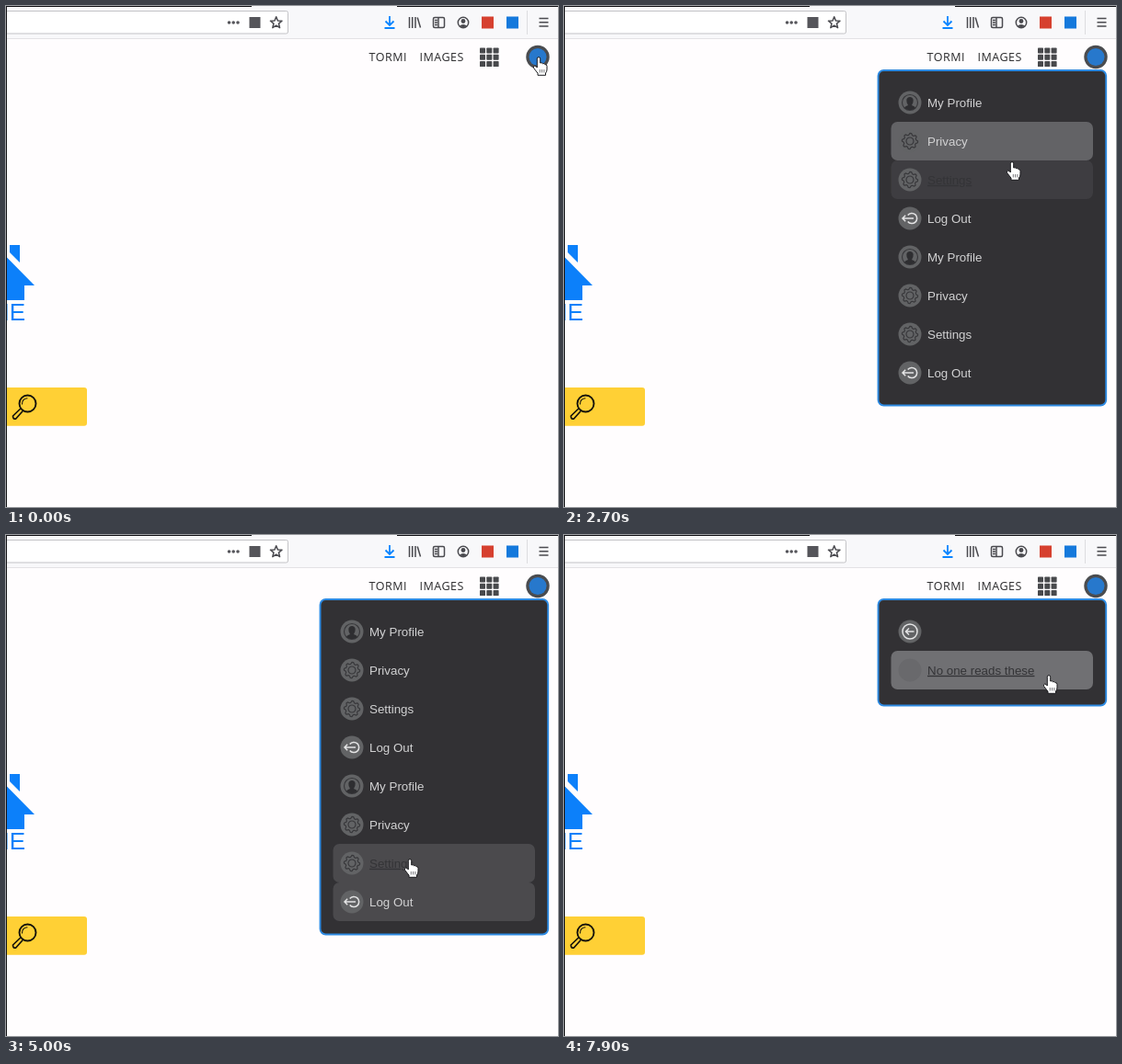
Recreate the animation shown at these times as an HTML page. Size 600 px wide and 545 px high, loop 8 s.

```html
<!DOCTYPE html>
<html lang="en">
<head>
<meta charset="utf-8">
<title>Dropdown menu</title>
<style>
html, body { margin: 0; width: 100%; height: 100%; overflow: hidden; background: #fffdfe; }
svg { display: block; width: 600px; height: 545px; }
.nav { font: 12.5px "Open Sans", "Noto Sans", sans-serif; letter-spacing: .5px; fill: #2a2a2c; }
.home { font: 26px "Liberation Sans", Arial, sans-serif; fill: #0c80fa; }
.row text { font: 13.35px "Liberation Sans", Arial, sans-serif; fill: #d2d2d3; }
.row.on text { fill: #343437; text-decoration: underline; }
.line { fill: none; stroke: #4a4a4f; stroke-width: 1.5; }
</style>
</head>
<body>
<svg viewBox="0 0 600 545">
  <defs><clipPath id="clip"><rect id="hole" x="342" y="70" width="247" height="364" rx="6"/></clipPath></defs>
  <rect width="600" height="545" fill="#fffdfe"/>

  <!-- browser toolbar -->
  <rect width="600" height="35" fill="#f8f8fa"/>
  <path d="M0 35.5H600" stroke="#e3e2e5"/>
  <path d="M0 .5H267M425 .5H600" stroke="#101014"/>
  <rect x="-10" y="5.5" width="316.5" height="24.500" rx="2" fill="#fff" stroke="#c3c3c6"/>
  <g fill="#55555a">
    <circle cx="242.500" cy="18" r="1.800"/><circle cx="247.200" cy="18" r="1.800"/><circle cx="252" cy="18" r="1.800"/>
    <rect x="264.500" y="12" width="12" height="12"/>
  </g>
  <path id="star" class="line" stroke-linejoin="round"/>
  <path d="M417 11V20M412.500 16.500L417 21L421.500 16.500M411.500 24H422.500" fill="none" stroke="#0a84ff" stroke-width="1.800"/>
  <path class="line" d="M438.500 12V24M441.700 12V24M445 12V24M447.200 12.500L450.500 23.500"/>
  <rect class="line" x="464.500" y="12.500" width="12" height="11" rx="1.500"/>
  <path class="line" d="M470 13V23M466 15.500H469M466 18H469M466 20.500H469" stroke-width="1.200"/>
  <circle class="line" cx="497" cy="18" r="5.700"/>
  <path d="M493 21.500Q497 18.500 501 21.500Q497 25 493 21.500" fill="#4a4a4f"/>
  <circle cx="497" cy="16.500" r="2.400" fill="#4a4a4f"/>
  <rect x="517" y="11.500" width="13" height="13" fill="#d6402f"/>
  <rect x="544" y="11.500" width="13" height="13" fill="#1479dc"/>
  <path d="M566.500 5V31" stroke="#dcdcdf"/>
  <path class="line" d="M579.500 13.500H589.500M579.500 17.800H589.500M579.500 22H589.500"/>

  <!-- page -->
  <text class="nav" x="394.500" y="60">TORMI</text>
  <text class="nav" x="449.500" y="60">IMAGES</text>
  <g id="grid" fill="#48494c"></g>
  <circle cx="578" cy="55.500" r="12.700" fill="#4b4c4f"/>
  <circle cx="578" cy="55.500" r="9.500" fill="#2778cc"/>
  <path d="M4 260H15V279L4 268ZM0 272.500L31 304H20V320H0Z" fill="#0c80fa"/>
  <text class="home" x="21" y="342" text-anchor="end">HOME</text>
  <rect x="-5" y="415" width="93" height="41.700" rx="3" fill="#ffd035"/>
  <g fill="none" stroke="#15130c" stroke-linecap="round">
    <circle cx="23.500" cy="432.500" r="9" stroke-width="1.900"/>
    <path d="M17.500 433Q17.500 427.500 23 426.800" stroke-width="1.100"/>
    <path d="M15.800 438L7.500 446Q7.500 449.500 10.500 449.200L18.300 440.500" stroke-width="1.700"/>
  </g>
  <path d="M.5 0V545" stroke="#151518"/>

  <!-- dropdown -->
  <g id="menu">
    <rect id="panel" x="341.500" y="70" width="247.700" height="365" rx="6" fill="#323134" stroke="#2d8ae2" stroke-width="1.900"/>
    <g clip-path="url(#clip)"><g id="main"></g><g id="sub"></g></g>
  </g>

  <g id="cursor">
    <path d="M-1.700 9V1.200Q-1.700 -.3 0 -.3Q1.700 -.3 1.700 1.200V6Q3.600 5.200 4.300 6.700Q6.200 6 6.800 7.600Q9 7.300 9 9.500V13Q9 15.500 7.500 17V19.300H-1V17.200L-5.400 11.500Q-6 9.500 -4.300 9Q-3 9 -1.700 11Z"
      fill="#fff" stroke="#1b1b1e" stroke-width="1" stroke-linejoin="round"/>
    <path d="M1.300 13V16.500M3.600 13V16.500M5.900 13V16.500" stroke="#55555a" stroke-width=".8"/>
  </g>
</svg>
<script>
const LOOP = 8000, STEP = 100;
const OPEN = 400, SWAP = 6400, SLIDE = 245, FADE = .2;
const $ = id => document.getElementById(id);

const ring = (n, radius, cx = 0, cy = 0) => 'M' + Array.from({ length: n }, (_, i) => {
  const a = i / n * 2 * Math.PI - Math.PI / 2, r = radius(i);
  return (cx + r * Math.cos(a)).toFixed(2) + ' ' + (cy + r * Math.sin(a)).toFixed(2);
}).join('L') + 'Z';

$('star').setAttribute('d', ring(10, i => i % 2 ? 2.9 : 6.6, 293.7, 18.3));
for (let i = 0; i < 9; i++)
  $('grid').innerHTML += `<rect x="${515 + i % 3 * 7.3}" y="${45.5 + (i / 3 | 0) * 7.3}" width="6" height="6" rx=".7"/>`;

const dark = 'fill="none" stroke="#38383b" stroke-width="1.2"';
const light = 'fill="none" stroke="#e4e4e5" stroke-width="1.5"';
const icons = {
  user: `<circle r="8.500" ${dark}/><path d="M-6 6Q-5.500 3.800 -2 3Q-4 0 -3.700 -3Q-3 -6 0 -6Q3 -6 3.700 -3Q4 0 2 3Q5.500 3.800 6 6Q0 10.500 -6 6Z" fill="#2e2e31"/>`,
  gear: `<path d="${ring(32, i => i % 4 < 2 ? 8.600 : 6.800)}" ${dark} stroke-linejoin="round"/><circle r="4" ${dark}/>`,
  exit: `<path d="M-2.300 -3.500A5.600 5.600 0 1 1 -2.300 3.500M4 0H-8M-4.800 -3.200L-8 0L-4.800 3.200" ${light}/>`,
  back: `<circle r="8" ${light} stroke-width="1.200"/><path d="M4.500 0H-4.500M-1 -3.500L-4.500 0L-1 3.500" ${light}/>`,
  none: ''
};

function addRows(id, items) {
  $(id).innerHTML = items.map(([icon, label], i) =>
    `<g class="row" transform="translate(376 ${105 + 42 * i})">
      <rect x="-20.500" y="-21" width="219.500" height="42" rx="7" fill="#707073" opacity="0"/>
      <circle r="12.500" fill="${icon === 'none' ? '#69696c' : '#626365'}"/>${icons[icon]}
      <text x="19" y="4.800">${label}</text></g>`).join('');
  return [...$(id).children];
}

const half = [['user', 'My Profile'], ['gear', 'Privacy'], ['gear', 'Settings'], ['exit', 'Log Out']];
const mainRows = addRows('main', [...half, ...half]);
const subRows = addRows('sub', [['back', ''], ['none', 'No one reads these']]);

// [time, x, y] of the fingertip
const path = [
  [0, 579, 56], [900, 579, 56], [1100, 572, 64], [1400, 530, 92], [1600, 510, 101],
  [1900, 504, 109], [2200, 498, 128], [2700, 487, 170], [3300, 474, 214], [3500, 471, 242],
  [3700, 467, 256], [4000, 458, 297], [4300, 450, 355], [4500, 448, 381], [4700, 446, 390],
  [4900, 442, 374], [5100, 436, 332], [5200, 433, 290], [5300, 430, 248], [5500, 426, 202],
  [5700, 426, 182], [5900, 427, 164], [6200, 428, 152], [6400, 428, 151], [7250, 427, 152],
  [7600, 480, 154], [7900, 527, 153], [8000, 529, 153]
];

// [time, hovered row]
const hovers = [
  [0, -1], [1400, 0], [2200, 1], [2700, 2], [3300, 3], [3700, 4], [4000, 5], [4300, 6],
  [4500, 7], [4900, 6], [5100, 5], [5200, 4], [5400, 3], [5600, 2], [5900, 1]
];
const hoverAt = t => hovers.filter(h => h[0] <= t).pop()[1];

// highlight strength of each row, per step
const glow = [];
for (let t = 0; t < LOOP; t += STEP) {
  const last = glow[glow.length - 1] || mainRows.map(() => 0);
  const hot = hoverAt(t);
  glow.push(last.map((v, i) => Math.min(1, Math.max(0, v + (i === hot ? FADE : -FADE)))));
}

function cursorAt(t) {
  const k = path.findIndex(p => p[0] > t);
  const [t0, x0, y0] = path[k - 1], [t1, x1, y1] = path[k];
  const f = (t - t0) / (t1 - t0);
  return [x0 + (x1 - x0) * f, y0 + (y1 - y0) * f];
}

// cubic-bezier(.25, .1, .25, 1)
function ease(x) {
  if (x <= 0 || x >= 1) return x <= 0 ? 0 : 1;
  const curve = (s, a, b) => 3 * s * (1 - s) ** 2 * a + 3 * s * s * (1 - s) * b + s ** 3;
  let lo = 0, hi = 1;
  for (let i = 0; i < 20; i++) {
    const mid = (lo + hi) / 2;
    if (curve(mid, .25, .25) < x) lo = mid; else hi = mid;
  }
  return curve(lo, .1, 1);
}

function paintRow(row, on, strength, width = 219.5) {
  row.classList.toggle('on', on);
  row.firstElementChild.setAttribute('opacity', strength);
  row.firstElementChild.setAttribute('width', width);
}

function draw(t) {
  const swapped = t >= SWAP;
  const shift = swapped ? ease((t - SWAP + 48) / 500) * SLIDE : 0;
  $('menu').style.display = t < OPEN ? 'none' : '';
  $('panel').setAttribute('height', swapped ? 115.5 : 364.5);
  $('hole').setAttribute('height', swapped ? 115 : 364);
  $('main').setAttribute('transform', `translate(${-shift})`);
  $('main').style.display = shift < SLIDE ? '' : 'none';
  $('sub').setAttribute('transform', `translate(${SLIDE - shift})`);
  $('sub').style.display = swapped ? '' : 'none';

  const hot = hoverAt(t);
  mainRows.forEach((row, i) => swapped
    ? paintRow(row, i === 1, i === 1 ? .12 : 0, SLIDE)
    : paintRow(row, i === hot, glow[t / STEP][i]));
  const subGlow = Math.min(1, Math.max(0, (t - 6600) / STEP * FADE));
  paintRow(subRows[1], subGlow > 0, subGlow);

  $('cursor').setAttribute('transform', `translate(${cursorAt(t)})`);
}

function tick() {
  draw(Math.floor(performance.now() % LOOP / STEP) * STEP);
  requestAnimationFrame(tick);
}
tick();
</script>
</body>
</html>
```
